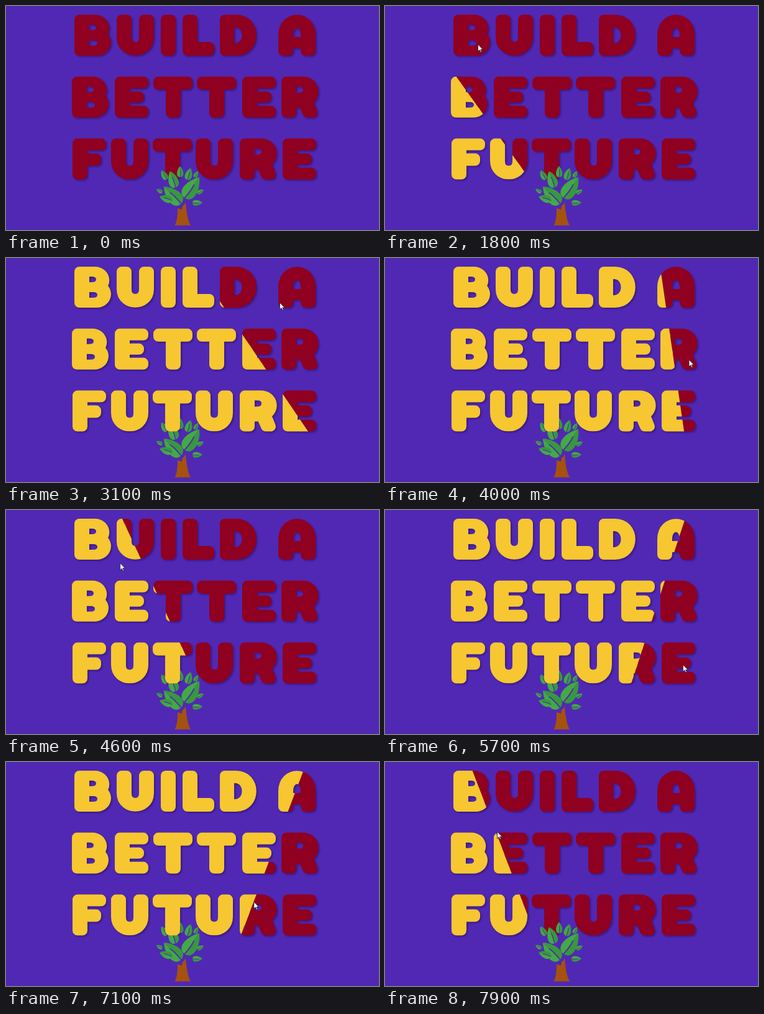
Animation of 600 by 361 pixels, one loop 8000 ms. Source, as an HTML page:

```html
<!DOCTYPE html>
<html lang="en">
<head>
<meta charset="utf-8">
<title>Build a better future</title>
<style>
  html, body { margin: 0; width: 100%; height: 100%; overflow: hidden; background: #5128b4; }
  svg { display: block; width: 100vw; height: 100vh; }
  #letters { stroke-width: 16; stroke-linejoin: round; fill-rule: evenodd; }
  .shadow { fill: #14053c; stroke: #14053c; opacity: .4; filter: blur(1.5px); }
  .base { fill: #900020; stroke: #900020; }
  .top { fill: #f6c730; stroke: #f6c730; }
  .vein { fill: none; stroke: #5128b4; }
</style>
</head>
<body>
<svg viewBox="0 0 600 361" role="img" aria-label="BUILD A BETTER FUTURE">
  <defs>
    <g id="letters"></g>
    <clipPath id="left"><polygon id="leftSide"/></clipPath>
    <clipPath id="right"><polygon id="rightSide"/></clipPath>
  </defs>
  <use class="shadow" href="#letters" x="2" y="2"/>
  <g clip-path="url(#right)"><use class="base" href="#letters"/></g>
  <g id="leaves"></g>
  <path fill="#a5520e" d="M271 353.5Q276 348 276 326L283 328L284 322L287 320L289 316Q291 344 297 353.5Z"/>
  <g clip-path="url(#left)"><use class="top" href="#letters"/></g>
  <path id="cursor" fill="#fff" stroke="#1c1c28" stroke-width=".8" d="M0 0V11L2.6 8.6L4.4 12.4L6 11.7L4.3 8H7.8Z"/>
</svg>
<script>
const $ = id => document.getElementById(id);

// Skeletons inset by 8: the round stroke gives every letter its soft corners.
const glyphs = {
  A: 'M8 58V33C8 0 52 0 52 33V58H44V46H16V58ZM16 44V33C16 7 44 7 44 33V44Z',
  B: 'M8 8H33C49 8 53 27 42 32C57 38 52 58 36 58H8ZM16 8H28C48 8 48 33 28 33H16ZM16 33H30C50 33 50 58 30 58H16Z',
  D: 'M8 8H26C59 8 59 58 26 58H8ZM15 12H24C50 12 50 54 24 54H15Z',
  E: 'M8 8H46V11H16V32H39V34H16V55H46V58H8Z',
  F: 'M8 8H46V11H16V32H38V36H16V58H8Z',
  I: 'M8 8H16V58H8Z',
  L: 'M8 8H16V52H43V58H8Z',
  R: 'M8 8H33C56 8 56 34 42 38L50 58H42L35 42H16V58H8ZM16 8H28C48 8 48 34 28 34H16Z',
  T: 'M8 8H55V13H36V58H28V13H8Z',
  U: 'M8 8H16V37C16 57 44 57 44 37V8H52V36C52 65 8 65 8 36Z'
};
const words = {
  BUILDA: [110, 178, 249, 284, 344, 438],
  BETTER: [106, 175, 237, 307, 380, 443],
  FUTURE: [107, 169, 236, 305, 376, 445]
};
$('letters').innerHTML = Object.entries(words).map(([word, xs], row) => xs.map((x, i) =>
  `<path transform="translate(${x} ${14 + row * 99.8})" d="${glyphs[word[i]]}"/>`).join('')).join('');

// Each leaf ends at its tip and points away from the top of the trunk.
function leaf([x, y, len]) {
  const turn = Math.atan2(y - 318, x - 281) * 180 / Math.PI;
  const half = (side, fill) =>
    `<path fill="${fill}" d="M${-len} 0C${-len} ${side * len * .4} ${-len * .4} ${side * len * .36} 0 0Z"/>`;
  return `<g transform="translate(${x} ${y}) rotate(${turn})">` +
    half(-1, '#43a947') + half(1, '#38983f') +
    `<path class="vein" stroke-width="${len * .045}" d="M${-len} 0Q${-len * .6} ${len * .06} ${-len * .35} 0"/></g>`;
}
$('leaves').innerHTML = [
  [280, 258, 18], [297, 261, 20], [250, 265, 17], [264, 266, 28],
  [311, 276, 41], [254, 291, 39], [247, 307, 21], [242, 295, 11],
  [309, 266, 12], [318, 296, 12], [316, 317, 16]
].map(leaf).join('');

// Resting points of the pointer: time, x, y.
const rests = [
  [1000, 33, 342], [1750, 148.5, 62], [3150, 441.5, 72], [4080, 490, 166],
  [4870, 70, 56], [5800, 493, 256], [6600, 490.5, 273], [8000, 176, 110]
];
function pointer(t) {
  const i = Math.max(1, rests.findIndex(r => r[0] > t));
  const [a, b] = [rests[i - 1], rests[i]];
  const u = Math.max(0, (t - a[0]) / (b[0] - a[0]));
  const ease = u * u * (3 - 2 * u);
  return [1, 2].map(k => a[k] + (b[k] - a[k]) * ease);
}

const STEP = 100, LOOP = 8000, START = 1000, H = 361;

// The dividing line trails the pointer by one step and tilts with its height.
function edge(t) {
  if (t < START) return [-200, -200];
  const [x, y] = pointer(t - STEP);
  const mid = 300 + (x - 300) * .9;
  const skew = (180 - y) / 160 * H / 2;
  return [mid - skew, mid + skew];
}

function draw() {
  const t = Math.floor(performance.now() % LOOP / STEP) * STEP;
  const [x, y] = pointer(t), [above, below] = edge(t);
  $('cursor').setAttribute('visibility', t < START ? 'hidden' : 'visible');
  $('cursor').setAttribute('transform', `translate(${x} ${y})`);
  const side = far => `${far},0 ${above},0 ${below},${H} ${far},${H}`;
  $('leftSide').setAttribute('points', side(-600));
  $('rightSide').setAttribute('points', side(1200));
  requestAnimationFrame(draw);
}
draw();
</script>
</body>
</html>
```
